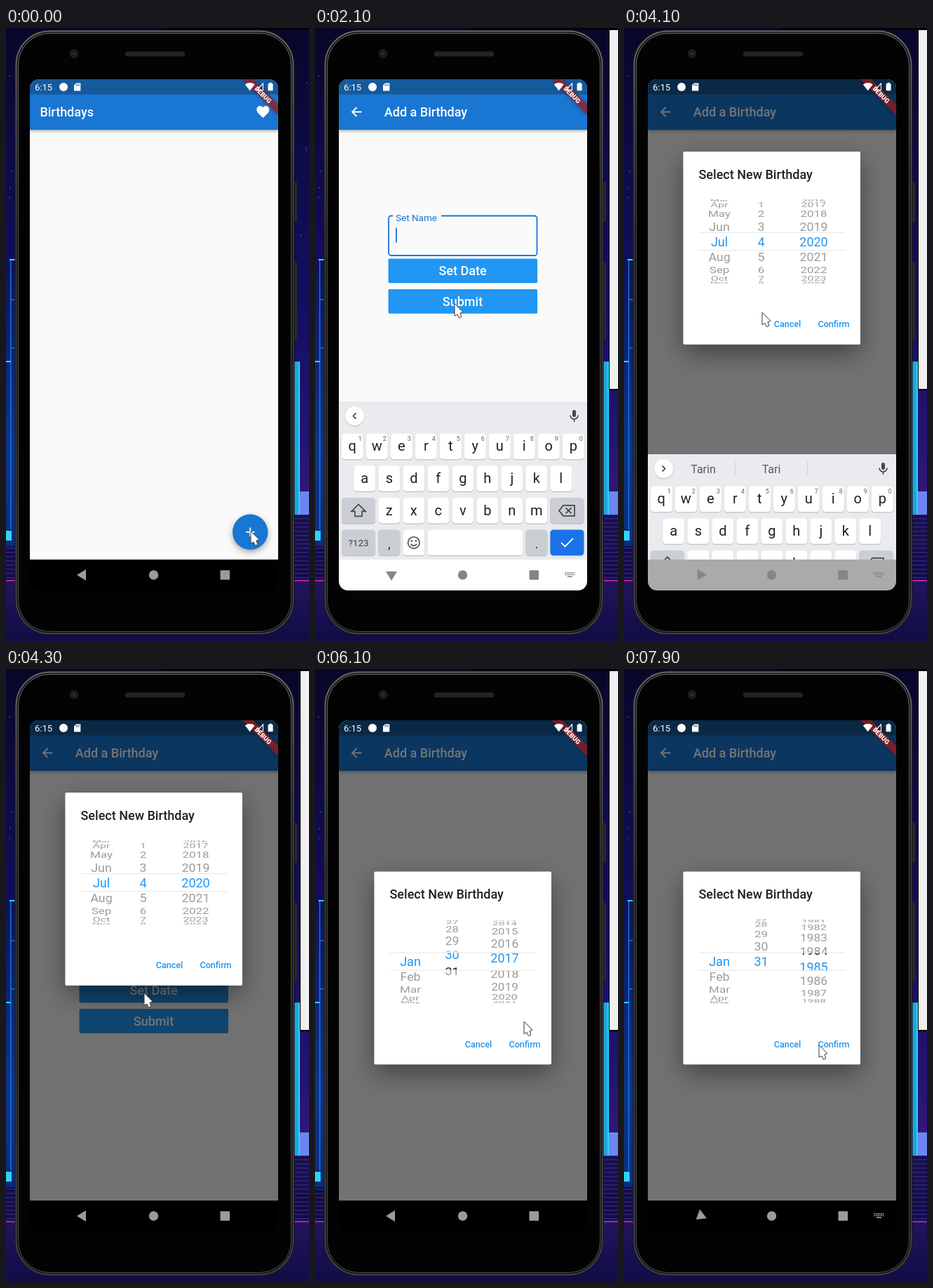
Write an HTML page with a canvas that moves like this. It is 432x873 px and loops after 8000 ms.

```html
<!DOCTYPE html>
<html lang="en">
<head>
<meta charset="utf-8">
<title>Birthdays</title>
<style>
html, body { margin: 0; width: 100%; height: 100%; overflow: hidden; background: #0b0a33; }
canvas { display: block; width: 432px; height: 873px; }
</style>
</head>
<body>
<canvas id="stage"></canvas>
<script>
const W = 432, H = 873, LOOP = 8000, STEP = 100;
const HELD = [5200, 5400, 7000, 7200]; // steps that repeat the one before
const canvas = document.getElementById('stage');
const dpr = window.devicePixelRatio || 1;
canvas.width = W * dpr;
canvas.height = H * dpr;
const c = canvas.getContext('2d');

const NAME = 'Tarin';
const BLUE = '#1976d2', SKY = '#2196f3', INK = '#202124', GRAY = '#45484d';
const MONTHS = 'Jan Feb Mar Apr May Jun Jul Aug Sep Oct Nov Dec'.split(' ');

// ---- motion ----
const linear = u => u;
const easeOut = u => 1 - (1 - u) ** 2;

function ramp(t, start, end, from, to, ease = linear) {
  const u = Math.min(1, Math.max(0, (t - start) / (end - start)));
  return from + (to - from) * ease(u);
}

// Where the pointer arrives, and when.
const STOPS = [[0, 349, 716], [600, 344, 715], [1400, 199, 392], [3100, 207, 402], [3700, 197, 348],
  [4300, 197, 461], [4500, 140, 425], [4900, 140, 588], [5100, 182, 431], [5300, 207, 420],
  [5500, 232, 158], [5900, 285, 415], [6300, 311, 588], [6700, 306, 541], [6900, 300, 415],
  [7100, 348, 740], [7900, 278, 535]];

function pointerAt(t) {
  const next = STOPS.findIndex(stop => stop[0] > t);
  if (next < 0) return STOPS[STOPS.length - 1].slice(1);
  const [t0, x0, y0] = STOPS[next - 1], [t1, x1, y1] = STOPS[next];
  const travel = Math.min(400, 8 * Math.hypot(x1 - x0, y1 - y0));
  const start = Math.max(t0, t1 - travel);
  return [ramp(t, start, t1, x0, x1), ramp(t, start, t1, y0, y1)];
}

const keyboardAt = t => ramp(t, 1700, 2000, 0, 1) - ramp(t, 4000, 4300, 0, 1);
const monthAt = t => ramp(t, 4500, 4900, 7, 1);
const dayAt = t => ramp(t, 5300, 6240, 4, 31, easeOut);
const yearAt = t => ramp(t, 5900, 6500, 2020, 2015, easeOut) - ramp(t, 6900, 8100, 0, 31.2, easeOut);

// ---- drawing helpers ----
function rect(x, y, w, h, color) {
  c.fillStyle = color;
  c.fillRect(x, y, w, h);
}

function round(x, y, w, h, r, color) {
  c.beginPath();
  c.roundRect(x, y, w, h, r);
  if (color) { c.fillStyle = color; c.fill(); }
}

function disc(x, y, r, color) {
  c.beginPath();
  c.arc(x, y, r, 0, Math.PI * 2);
  c.fillStyle = color;
  c.fill();
}

function poly(points, color) {
  c.beginPath();
  points.forEach(([x, y]) => c.lineTo(x, y));
  c.closePath();
  if (color) { c.fillStyle = color; c.fill(); }
}

function stroke(color, width = 1) {
  c.strokeStyle = color;
  c.lineWidth = width;
  c.stroke();
}

function line(points, color, width) {
  c.beginPath();
  points.forEach(([x, y]) => c.lineTo(x, y));
  stroke(color, width);
}

function arc(x, y, r, from, to, color, width) {
  c.beginPath();
  c.arc(x, y, r, from, to);
  stroke(color, width);
}

// y is the middle of the capital letters
function text(s, x, y, size, color, align = 'left', weight = 400) {
  c.font = `${weight} ${size}px Roboto, sans-serif`;
  c.textAlign = align;
  c.fillStyle = color;
  c.fillText(s, x, y + size * .355);
}

function scoped(draw) {
  c.save();
  draw();
  c.restore();
}

function shaded(alpha, blur, dy, draw) {
  scoped(() => {
    c.shadowColor = `rgba(0,0,0,${alpha})`;
    c.shadowBlur = blur * dpr;
    c.shadowOffsetY = dy * dpr;
    draw();
  });
}

function clipped(x, y, w, h, draw) {
  scoped(() => {
    c.beginPath();
    c.rect(x, y, w, h);
    c.clip();
    draw();
  });
}

function fade(y0, y1, ...colors) {
  const g = c.createLinearGradient(0, y0, 0, y1);
  colors.forEach((color, i) => g.addColorStop(i / (colors.length - 1), color));
  return g;
}

// ---- wallpaper and phone ----
function wallpaper() {
  const cyan = '#2ed3f5', blue = '#1c74c4';
  rect(0, 0, W, H, fade(0, 790, '#080728', '#0e0b4a', '#140e62', '#241573', '#4a1c86'));
  rect(0, 330, 13, 410, fade(330, 740, '#0d1259', '#0b2478', '#0a3690', '#0b2a80'));
  let seed = 7;
  const random = () => (seed = seed * 16807 % 2147483647) / 2147483647;
  for (let i = 0; i < 8; i++) rect(i % 2 ? 2 + random() * 8 : 420 + random() * 10, random() * 320, 1.5, 1.5, '#2f6fb0');

  rect(6, 329, 1.5, 385, blue);
  for (const y of [386, 455]) rect(6, y, 7, 1.5, blue);
  rect(5, 329, 8, 2, cyan);
  rect(0, 474, 7, 2, cyan);
  rect(0, 716, 8, 14, cyan);
  rect(411, 475, 8, 218, '#1fa5dd');
  rect(417, 475, 2, 218, cyan);
  rect(419, 660, 13, 33, '#6b86f2');

  rect(0, 738, W, 50, '#120d48');
  rect(411, 694, 21, 50, '#17104d');
  for (let y = 698; y < 786; y += 6) rect(y < 738 ? 411 : 0, y, W, 1.5, '#33247a');
  rect(0, 788, W, H, fade(788, H, '#22145f', '#100d45'));
  rect(0, 786, W, 2, '#b3219c');
  rect(223, 0, W, 2, '#000');
}

function phone() {
  for (const [y, h] of [[219, 57], [333, 112]]) round(408, y, 7, h, 2, '#29292b');
  const ring = (inset, r) => round(12.5 + inset, 2.5 + inset, 399 - 2 * inset, 862 - 2 * inset, r);
  ring(0, 50);
  c.fillStyle = '#18181a';
  c.fill();
  ring(2, 48);
  stroke(fade(4, 862, '#77787b', '#3c3d40', '#3c3d40', '#4b4c4f'), 1.5);
  ring(5, 45);
  c.fillStyle = '#030303';
  c.fill();
  stroke(fade(4, 862, '#6d6e71', '#48494c', '#48494c', '#48494c'));
  round(170, 33.5, 85, 7, 3, '#242426');
  disc(97, 36.5, 6.5, '#1c1c20');
  disc(97, 36.5, 2, '#2b2c48');
}

// ---- app ----
function heart(x, y) {
  c.beginPath();
  c.moveTo(x, y + 8.4);
  for (const side of [-1, 1]) {
    c.moveTo(x, y + 8.4);
    c.bezierCurveTo(x + side * 6, y + 3, x + side * 9, y, x + side * 9, y - 3.2);
    c.bezierCurveTo(x + side * 9, y - 9.4, x + side * 2.4, y - 9.7, x, y - 6.3);
  }
  c.fillStyle = '#fff';
  c.fill();
}

function appBar(adding) {
  shaded(.3, 4, 1.5, () => rect(34, 73, 354, 72, BLUE));
  rect(34, 73, 354, 21.6, '#165a9c');
  text(adding ? 'Add a Birthday' : 'Birthdays', adding ? 98.8 : 48.4, 120, 18, '#fff', 'left', 500);
  if (adding) {
    line([[59.5, 113], [53, 119.5], [59.5, 126]], '#fff', 1.8);
    line([[53, 119.5], [66.4, 119.5]], '#fff', 1.8);
  } else {
    heart(366.4, 119.5);
  }
}

function addButton() {
  const x = 348.2, y = 717.8;
  shaded(.35, 8, 3.5, () => disc(x, y, 25.2, BLUE));
  rect(x - 6.3, y - .9, 12.6, 1.8, '#fff');
  rect(x - .9, y - 6.3, 1.8, 12.6, '#fff');
}

function form(t, lift) {
  const focused = t >= 1700, y = 379.5 - lift;
  round(105, y, 211.5, 56.5, 3.6);
  stroke(focused ? BLUE : '#8f8f8f', focused ? 1.8 : 1);
  if (focused) {
    const typed = t >= 3100 ? NAME : '';
    rect(111, y - 2, 69, 4, '#fafafa');
    text('Set Name', 115, y + 2.5, 13.5, BLUE);
    text(typed, 115, y + 27.5, 18, INK);
    const w = c.measureText(typed).width;
    rect(115, y + 35.5, w, 1, INK);
    rect(115 + w, y + 17, 1.8, 21, BLUE);
  } else {
    text('Set Name', 115, y + 29, 18, '#757575');
  }
  ['Set Date', 'Submit'].forEach((label, i) => {
    const top = y + 61 + i * 43.5;
    round(104.5, top, 212.5, 34.8, 1.8, SKY);
    text(label, 210.5, top + 17.6, 18, '#fff', 'center', 500);
  });
}

// ---- date dialog ----
function wheel(x, cy, pos, lo, hi, label = String) {
  const radius = 62, pitch = 24.5, half = 12.7, chosen = Math.round(pos);
  const item = i => text(label(i), 0, 0, 18, i === chosen ? SKY : INK, 'center');
  const each = (reach, draw) => {
    for (let i = Math.max(lo, chosen - reach); i <= Math.min(hi, chosen + reach); i++)
      scoped(() => draw(i, i - pos));
  };
  const rolled = () => each(5, (i, d) => {
    const angle = d * .354, cos = Math.cos(angle);
    if (cos < .05) return;
    c.globalAlpha *= .447;
    c.translate(x, cy + radius * Math.sin(angle) / (1.06 - .06 * cos));
    c.scale(1 / (1.25 - .25 * cos), cos);
    item(i);
  });
  clipped(x - 40, cy - 61, 80, 61 - half, rolled);
  clipped(x - 40, cy + half, 80, 61 - half, rolled);
  clipped(x - 40, cy - half, 80, 2 * half, () => each(1, (i, d) => {
    c.translate(x, cy + d * pitch);
    item(i);
  }));
}

function dialog(t, alpha) {
  rect(34, 73, 354, 684, `rgba(0,0,0,${.54 * alpha})`);
  scoped(() => {
    c.globalAlpha = alpha;
    const y = ramp(t, 4300, 4500, 176, 288.5), cy = y + 128.3;
    shaded(.42, 36, 13, () => round(84.4, y, 252.6, 274.7, 2, '#fff'));
    text('Select New Birthday', 106.5, y + 32.5, 18, INK, 'left', 500);
    wheel(136, cy, monthAt(t), 1, 12, i => MONTHS[i - 1]);
    wheel(195.5, cy, dayAt(t), 1, 31);
    wheel(270.5, cy, yearAt(t), 1900, 2100);
    for (const dy of [-13.3, 12]) rect(106.5, cy + dy, 209, 1, '#e6e6e6');
    text('Cancel', 233, y + 246, 12.6, SKY, 'center', 500);
    text('Confirm', 299, y + 246, 12.6, SKY, 'center', 500);
  });
}

// ---- system ui ----
function banner() {
  scoped(() => {
    c.translate(388, 73);
    c.rotate(Math.PI / 4);
    shaded(.5, 5, 0, () => rect(-36, 25.2, 72, 10.8, 'rgba(183,28,28,.63)'));
    text('DEBUG', .5, 30.8, 9.2, '#fff', 'center', 900);
  });
}

function statusIcons() {
  text('6:15', 41, 84, 13, '#fff');
  disc(82, 84, 6, '#fff');
  poly([[100, 78.5], [106.3, 78.5], [106.3, 89.5], [97, 89.5], [97, 81.5]], '#fff');
  for (let x = 99.6; x < 105; x += 2) rect(x, 80, 1, 2.5, '#165a9c');
  c.beginPath();
  c.moveTo(347.7, 89.3);
  c.arc(347.7, 89.3, 11.2, -Math.PI * .71, -Math.PI * .29);
  c.fillStyle = '#fff';
  c.fill();
  poly([[366.5, 79], [366.5, 88.5], [357.5, 88.5]]);
  stroke('#fff', 1.1);
  rect(375.6, 77.7, 3, 2, '#fff');
  round(373.6, 79, 7, 10.3, 1, '#fff');
}

function navBar(white, turn) {
  rect(34, 757, 354, 44, '#000');
  rect(34, 757, 354, 44, `rgba(255,255,255,${white})`);
  const color = white > .5 ? '#858585' : '#9b9b9b';
  scoped(() => {
    c.translate(109, 779);
    c.rotate(-turn * Math.PI / 2);
    poly([[-8, 0], [5, -8], [5, 8]], color);
  });
  disc(210.5, 779, 6.7, color);
  round(305.5, 772.3, 13.5, 13.5, 1, color);
  if (turn) {
    for (let i = 0; i < 12; i++) rect(356.3 + i % 6 * 2.5, i < 6 ? 775 : 777.6, 1.7, 1.7, color);
    rect(360, 780.5, 7, 1.6, color);
  }
}

const KEY_ROWS = ['qwertyuiop', 'asdfghjkl', 'zxcvbnm'];
const rowTop = row => 577.8 + row * 45.55;

function key(cx, row, w, color = '#fff') {
  shaded(.22, 1, 1, () => round(cx - w / 2, rowTop(row), w, 36.5, 4.5, color));
}

function suggestions(t) {
  shaded(.2, 2, 1, () => disc(56.5, 552.5, 13.5, '#fff'));
  const way = t < 2400 ? -1 : 1;
  line([-1, 0, 1].map(i => [56.5 + way * (2 - 4 * Math.abs(i)), 552.5 + i * 4.2]), GRAY, 1.7);
  if (t >= 2400) for (const x of [158, 261]) rect(x, 542, 1, 21, '#d2d4d8');
  if (t >= 3100) {
    text(NAME, 113, 553, 16, '#56595e', 'center');
    text(NAME.slice(0, -1), 210, 553, 16, '#56595e', 'center');
  }
  round(367, 544, 5, 10, 2.5, GRAY);
  arc(369.5, 551.5, 5.5, 0, Math.PI, GRAY, 1.6);
  rect(368.7, 557, 1.6, 4, GRAY);
}

function keyIcons() {
  const [x, y] = [62, rowTop(2) + 18.5];
  poly([[x, y - 9], [x + 10, y + 1], [x + 5, y + 1], [x + 5, y + 8], [x - 5, y + 8], [x - 5, y + 1], [x - 10, y + 1]]);
  stroke(GRAY, 1.7);
  poly([[348, y], [354, y - 7.5], [370, y - 7.5], [370, y + 7.5], [354, y + 7.5]]);
  stroke(GRAY, 1.7);
  for (const s of [-4, 4]) line([[361.5 - s, y - 4], [361.5 + s, y + 4]], GRAY, 1.7);

  const smile = [140.8, rowTop(3) + 18.5];
  arc(...smile, 8.2, 0, Math.PI * 2, GRAY, 1.6);
  arc(...smile, 4.4, .4, Math.PI - .4, GRAY, 1.6);
  for (const s of [-3, 3]) disc(smile[0] + s, smile[1] - 2.5, 1.3, GRAY);
  line([[351, smile[1]], [356.5, smile[1] + 5.5], [368, smile[1] - 6]], '#fff', 1.8);
}

function keyboard(t, shown) {
  const dark = '#cbced4';
  clipped(34, 500, 354, 257, () => {
    c.translate(0, (1 - shown) * 225);
    rect(34, 532, 354, 226, '#e9ebee');
    suggestions(t);
    KEY_ROWS.forEach((letters, row) => [...letters].forEach((ch, i) => {
      const x = 210.8 + (i - (letters.length - 1) / 2) * 35, y = rowTop(row);
      key(x, row, 31);
      text(ch, x, y + 17.5, 20, INK, 'center');
      if (!row) text((i + 1) % 10, x + 11, y + 7, 9, '#5f6368', 'center');
    }));
    for (const x of [62, 359.4]) key(x, 2, 48, dark);
    key(62, 3, 48, dark);
    key(140.8, 3, 31);
    key(228.3, 3, 136);
    key(359.4, 3, 48, '#1a73e8');
    const y = rowTop(3) + 19;
    text('?123', 62, y, 13.5, '#3c4043', 'center');
    [',', '.'].forEach((ch, i) => {
      const x = 105.8 + i * 210;
      key(x, 3, 31, dark);
      text(ch, x, y + 1, 18, INK, 'center');
    });
    keyIcons();
  });
}

function pointer(x, y) {
  scoped(() => {
    c.translate(x, y + .5);
    c.lineJoin = 'round';
    poly([[0, 0], [0, 17.5], [4, 15.5], [6.4, 20.6], [9.8, 19], [8, 13.5], [12, 12]], '#fff');
    stroke('#3a3a3a');
  });
}

function draw(t) {
  c.setTransform(dpr, 0, 0, dpr, 0, 0);
  wallpaper();
  phone();
  if (t >= 100) {
    rect(419, 2, 13, 514, '#000');
    rect(420, 3, 12, 511, '#f0f0f0');
  }
  const shown = keyboardAt(t), open = ramp(t, 3700, 4000, 0, 1);
  const adding = t >= 800, lifted = t >= 1800 && t < 4200;
  scoped(() => {
    round(34, 73, 354, 728, 13);
    c.clip();
    rect(34, 73, 354, 684, '#fafafa');
    if (adding) form(t, lifted ? 112 : 0);
    else addButton();
    appBar(adding);
    if (open) dialog(t, open);
    banner();
    statusIcons();
    if (shown) keyboard(t, shown);
    navBar(shown, shown + ramp(t, 7800, 7900, 0, .42));
  });
  pointer(...pointerAt(t));
}

let last = -1;
function tick(now) {
  let t = Math.floor(now % LOOP / STEP) * STEP;
  if (HELD.includes(t)) t -= STEP;
  if (t !== last) draw(last = t);
  requestAnimationFrame(tick);
}
draw(0);
requestAnimationFrame(tick);
</script>
</body>
</html>
```
